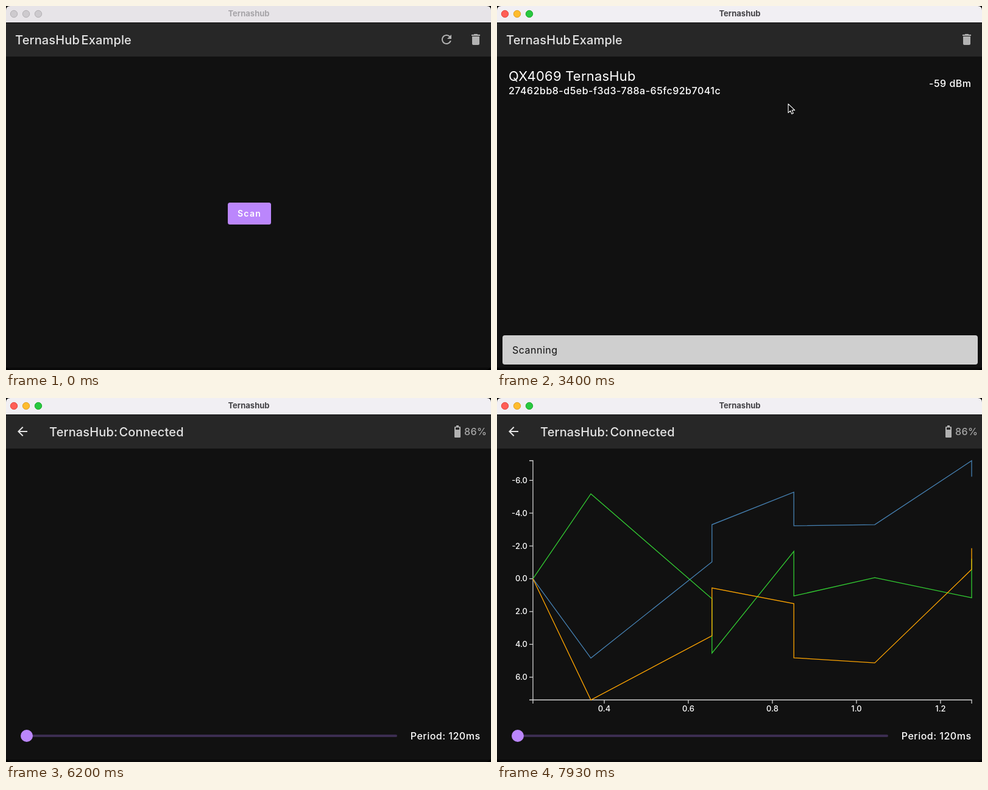
An HTML page that plays this animation: 796 by 598 pixels, repeating every 8 s.

```html
<!DOCTYPE html>
<html lang="en">
<head>
<meta charset="utf-8">
<title>Ternashub</title>
<style>
  html, body { margin: 0; width: 100%; height: 100%; overflow: hidden; background: #000; }
  svg { display: block; width: 100%; height: 100%; }
  text { font-family: Inter, Roboto, sans-serif; fill: #fff; }
  .heading { font-size: 20px; font-weight: 500; letter-spacing: .15px; fill: #e4e4e4; }
  .body { font-size: 16px; font-weight: 500; letter-spacing: .5px; }
  .end { text-anchor: end; }
  .middle { text-anchor: middle; }
  .icon { fill: #b2b2b2; }
  #windowTitle { font-size: 13px; font-weight: 700; }
  #chart text { font-size: 13px; font-weight: 500; }
  #chart path { fill: none; stroke-width: 1.3; }
</style>
</head>
<body>
<svg viewBox="0 0 796 598">
  <rect width="796" height="598" rx="9" fill="#0a0a0a"/>
  <rect y="28" width="796" height="566" fill="#111"/>
  <rect y="28" width="796" height="55" fill="#272727"/>
  <path id="titleBar" d="M0 27V7Q0 0 7 0H789Q796 0 796 7V27Z"/>
  <g id="lights" stroke-width="1">
    <circle cx="13" cy="13" r="5.7"/><circle cx="33" cy="13" r="5.7"/><circle cx="53" cy="13" r="5.7"/>
  </g>
  <text id="windowTitle" class="middle" x="398.5" y="17">Ternashub</text>

  <g data-show="0 4000">
    <text class="heading" x="15" y="63">TernasHub</text>
    <text class="heading" x="123.5" y="63">Example</text>
    <path class="icon" transform="translate(759 43)" d="M6 19c0 1.1.9 2 2 2h8c1.1 0 2-.9 2-2V7H6v12zM19 4h-3.5l-1-1h-5l-1 1H5v2h14V4z"/>
    <path id="refresh" data-show="0 2400" transform="translate(711 43)" d="M17.65 6.35C16.2 4.9 14.21 4 12 4c-4.42 0-7.99 3.58-7.99 8s3.57 8 7.99 8c3.73 0 6.84-2.55 7.73-6h-2.08c-.82 2.33-3.04 4-5.65 4-3.31 0-6-2.69-6-6s2.69-6 6-6c1.66 0 3.14.69 4.22 1.78L13 11h7V4l-2.35 2.35z"/>
    <g data-show="0 2130">
      <rect x="364" y="323" width="71" height="36" rx="3.5" fill="#bb86fc"/>
      <text x="380" y="346" font-size="14" font-weight="600" letter-spacing="1.25">Scan</text>
    </g>
    <g data-show="2930 4000">
      <text x="19" y="123" font-size="22" letter-spacing=".2">QX4069 TernasHub</text>
      <text class="body" x="19" y="145">27462bb8-d5eb-f3d3-788a-65fc92b7041c</text>
      <text class="body end" x="778.5" y="133">-59 dBm</text>
    </g>
    <g id="snackbar">
      <rect x="9" y="541" width="780" height="48" rx="4" fill="#cfcfcf"/>
      <text x="25" y="571" font-size="16" letter-spacing=".5" style="fill:#111">Scanning</text>
    </g>
  </g>

  <g data-show="4000 8000">
    <path fill="#e4e4e4" transform="translate(15 43)" d="M20 11H7.83l5.59-5.59L12 4l-8 8 8 8 1.41-1.41L7.83 13H20v-2z"/>
    <text class="heading" x="71" y="63">TernasHub:</text>
    <text class="heading" id="status" x="185.5" y="63"></text>
    <g data-show="6070 8000">
      <path class="icon" transform="translate(729 43)" d="M15.67 4H14V2h-4v2H8.33C7.6 4 7 4.6 7 5.33v15.33C7 21.4 7.6 22 8.33 22h7.33c.74 0 1.34-.6 1.34-1.33V5.33C17 4.6 16.4 4 15.67 4z"/>
      <rect x="738" y="48.5" width="6" height="3.5" fill="#272727"/>
      <text class="body end" x="789.5" y="61" style="fill:#a8a8a8">86%</text>
    </g>
    <g data-show="5930 8000">
      <path d="M34 555H640" stroke="#3c2d51" stroke-width="4" stroke-linecap="round"/>
      <circle cx="34" cy="555" r="10" fill="#bb86fc"/>
      <text class="body end" x="778.5" y="561">Period: 120ms</text>
    </g>
    <g id="chart"></g>
  </g>

  <path id="spinner" fill="none" stroke="#bb86fc" stroke-width="4" stroke-linecap="square"/>
  <path id="cursor" d="M0 0V14.5L3.5 11.3L5.8 16.5L8.3 15.4L6 10.3H10.7Z" fill="#000" stroke="#fff" stroke-width="1.1" stroke-linejoin="round"/>
</svg>

<script>
const LOOP = 8000;
const $ = id => document.getElementById(id);
const timed = [...document.querySelectorAll('[data-show]')].map(node => {
  const [from, to] = node.dataset.show.split(' ').map(Number);
  return { node, from, to };
});
const show = (node, on) => { node.style.display = on ? '' : 'none'; };
const clamp = v => Math.min(1, Math.max(0, v));

// Cursor: time, x, y
const cursorPath = [
  [470, 570, 420], [700, 572, 398], [1130, 445, 362], [1330, 445, 362], [1800, 403, 341],
  [2870, 403, 341], [3050, 497, 312], [3250, 478, 222], [3400, 478, 161], [3630, 478, 122], [4330, 478, 122]
];

function drawCursor(t) {
  const i = cursorPath.findIndex(p => p[0] > t);
  show($('cursor'), i > 0);
  if (i < 1) return;
  const [a, b] = [cursorPath[i - 1], cursorPath[i]];
  const k = (t - a[0]) / (b[0] - a[0]);
  const at = n => a[n] + (b[n] - a[n]) * k;
  $('cursor').setAttribute('transform', `translate(${at(1)} ${at(2)})`);
}

// cubic-bezier(.4, 0, .2, 1), solved by bisection
function ease(x) {
  let lo = 0, hi = 1, s = .5;
  for (let i = 0; i < 20; i++) {
    s = (lo + hi) / 2;
    const bx = 1.2 * s * (1 - s) ** 2 + .6 * s * s * (1 - s) + s ** 3;
    if (bx < x) lo = s; else hi = s;
  }
  return s * s * (3 - 2 * s);
}

function drawSpinner(t) {
  const start = t < 2930 ? 2162 : 4092;
  const on = t >= start && (t < 2930 || t < 5930);
  show($('spinner'), on);
  if (!on) return;
  const turn = Math.floor((t - start) / 1332), p = (t - start) % 1332;
  const base = 286 * p / 1332 + 216 * turn;
  const head = base + 290 * ease(clamp(p / 666));
  const tail = Math.min(base + 290 * ease(clamp((p - 666) / 666)), head - .5);
  const point = deg => {
    const r = deg * Math.PI / 180;
    return `${399.5 + 18 * Math.sin(r)} ${341 - 18 * Math.cos(r)}`;
  };
  $('spinner').setAttribute('d', `M${point(tail)}A18 18 0 ${head - tail > 180 ? 1 : 0} 1 ${point(head)}`);
}

// Samples: arrival, seconds, blue, green, orange
const samples = [
  [6530, .2303, 0, 0, 0],
  [6600, .3681, 4.84, -5.18, 7.39],
  [6900, .6562, -1.03, 1.22, 3.48],
  [7130, .6562, -3.3, 4.54, .56],
  [7130, .851, -5.28, -1.67, 1.52],
  [7330, .851, -3.23, 1.05, 4.82],
  [7530, 1.0435, -3.3, -.07, 5.13],
  [7730, 1.274, -7.2, 1.16, -.57],
  [7870, 1.274, -6.23, -1.22, -1.86]
];
const colors = ['#4682b4', '#32cd32', '#ffa500'];

function ticks(min, max) {
  const raw = (max - min) / 5, power = 10 ** Math.floor(Math.log10(raw)), ratio = raw / power;
  const step = power * (ratio >= Math.sqrt(50) ? 10 : ratio >= Math.sqrt(10) ? 5 : ratio >= Math.SQRT2 ? 2 : 1);
  const list = [];
  for (let i = Math.ceil(min / step); i * step <= max; i++) {
    list.push([i * step, (i * step).toFixed(step < .099 ? 2 : 1)]);
  }
  return list;
}

function chartMarkup(rows) {
  if (rows.length < 2) return '';
  const left = 59, right = 779, top = 103, bottom = 496;
  const x0 = rows[0][1], x1 = rows[rows.length - 1][1];
  const values = rows.flatMap(r => r.slice(2));
  const y0 = Math.min(...values), y1 = Math.max(...values);
  const X = v => left + (right - left) * (v - x0) / (x1 - x0);
  const Y = v => top + (bottom - top) * (v - y0) / (y1 - y0);

  let axis = `M53 ${top}H${left}V${bottom + 6}M53 ${bottom}H${right}V${bottom + 6}`, labels = '';
  for (const [v, label] of ticks(y0, y1)) {
    axis += `M53 ${Y(v)}H${left}`;
    labels += `<text class="end" x="50" y="${Y(v) + 4.5}">${label}</text>`;
  }
  for (const [v, label] of ticks(x0, x1)) {
    axis += `M${X(v)} ${bottom}v6`;
    labels += `<text class="middle" x="${X(v)}" y="515">${label}</text>`;
  }
  const lines = colors.map((color, i) =>
    `<path stroke="${color}" d="M${rows.map(r => `${X(r[1])} ${Y(r[i + 2])}`).join('L')}"/>`);
  return `<path stroke="#d2d2d2" d="${axis}"/>${labels}${lines.join('')}`;
}

let drawnCount = -1;
function drawChart(t) {
  const rows = samples.filter(s => s[0] <= t);
  if (rows.length === drawnCount) return;
  drawnCount = rows.length;
  $('chart').innerHTML = chartMarkup(rows);
}

function drawWindow(t) {
  const active = t >= 2000;
  $('titleBar').setAttribute('fill', active ? '#f1eff3' : '#e7e4e8');
  $('windowTitle').style.fill = active ? '#434246' : '#a6a4a8';
  [...$('lights').children].forEach((light, i) => {
    light.setAttribute('fill', active ? ['#ff5f57', '#febc2e', '#28c840'][i] : '#cdcace');
    light.setAttribute('stroke', active ? ['#e2463f', '#e0a028', '#1aab29'][i] : '#b4b1b5');
  });
}

function render(t) {
  for (const { node, from, to } of timed) show(node, t >= from && t < to);
  drawWindow(t);
  $('refresh').style.fill = t < 2130 ? '#b2b2b2' : '#111';
  $('snackbar').style.opacity = clamp((t - 2070) / 100);
  $('status').textContent = t < 4670 ? 'Disconnected' : t < 5930 ? 'Connecting' : 'Connected';
  drawSpinner(t);
  drawChart(t);
  drawCursor(t);
}

const begin = performance.now();
function loop() {
  render((performance.now() - begin) % LOOP);
  requestAnimationFrame(loop);
}
loop();
</script>
</body>
</html>
```
